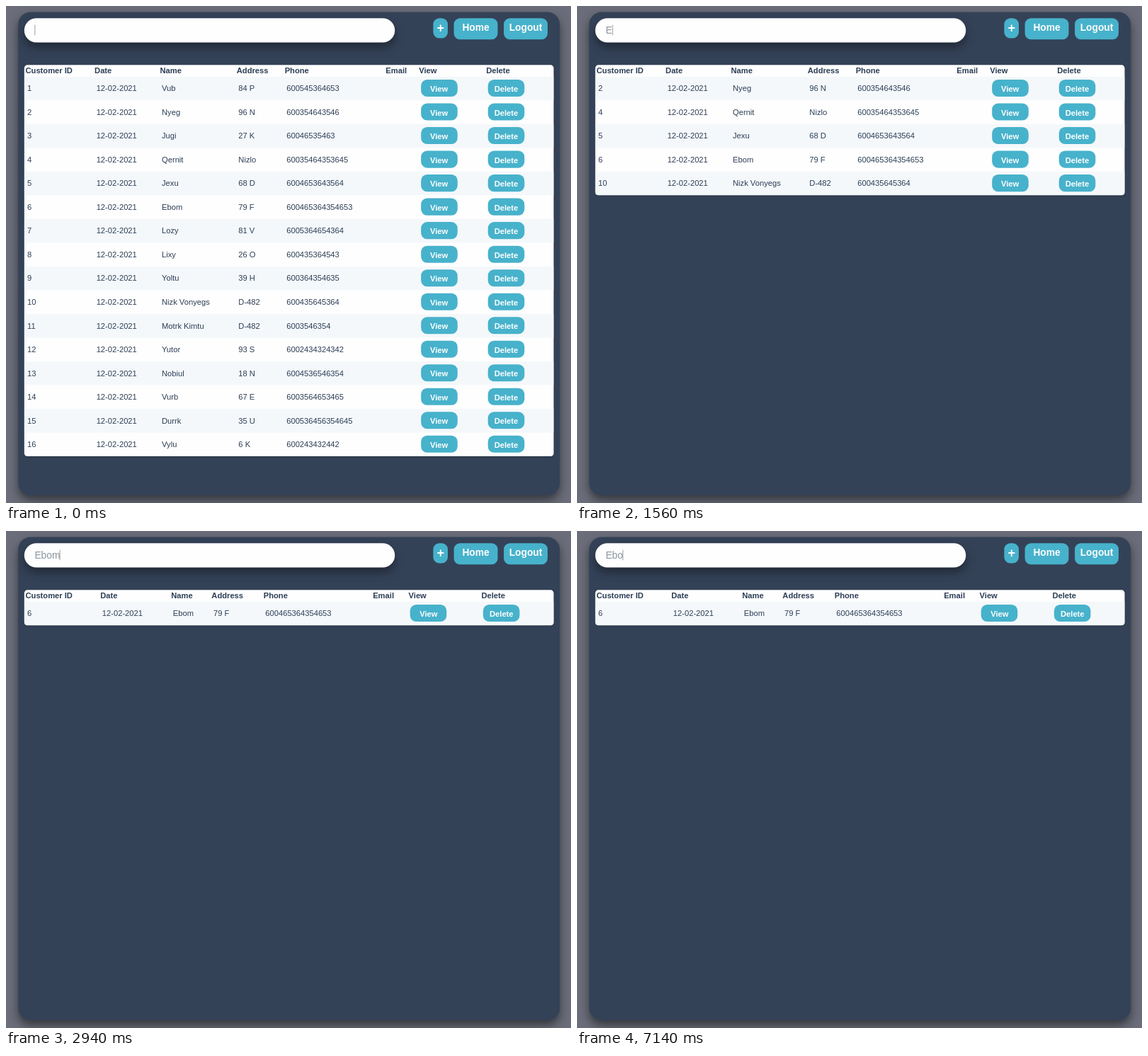
Recreate the animation shown at these times as an HTML page. Size 798 px wide and 702 px high, loop 8 s.

```html
<!DOCTYPE html>
<html lang="en">
<head>
<meta charset="utf-8">
<title>Customer search</title>
<style>
  * { box-sizing: border-box; }
  html, body { margin: 0; width: 798px; height: 702px; overflow: hidden; }
  body { background: #6b6e7a; }
  /* The page is laid out at full size and shown slightly reduced */
  .page {
    position: relative;
    width: 930px; height: 817px;
    transform: scale(.8595);
    transform-origin: 0 0;
    color: #2c3e55;
    font: 13px "Liberation Sans", Arial, sans-serif;
    white-space: nowrap;
  }
  .panel, .search, .view, .btn.top, .caret { position: absolute; }
  .panel {
    left: 20px; top: 10px; width: 890px; height: 794px;
    border-radius: 20px;
    background: #344258;
    box-shadow: 0 8px 16px rgba(0, 0, 0, .5);
  }
  .search {
    left: 30px; top: 20px; width: 609px; height: 40px;
    padding-left: 17px;
    border-radius: 20px;
    background: #fefefe;
    box-shadow: 0 8px 16px rgba(0, 0, 0, .4);
    color: #8b949d;
    font-size: 16px;
    line-height: 40px;
  }
  .btn {
    display: flex; align-items: center; justify-content: center;
    border-radius: 10px;
    background: #47b2cb;
    color: #fefefe;
    font-weight: bold;
  }
  .btn.top {
    top: 20px; width: 72px; height: 35px;
    padding-bottom: 4px;
    font-size: 16px;
  }
  .btn.add { width: 24px; height: 33px; padding-bottom: 1px; font-size: 21px; }

  .view {
    left: 30px; top: 97px; width: 870px;
    border-radius: 5px;
    overflow: hidden;
    background: #fefefe;
    box-shadow: 0 1px 3px rgba(0, 0, 0, .25);
    --cols: 113.5px 107.5px 126px 79px 166px 54.5px 110.5px 1fr;
  }
  .row {
    display: grid;
    grid-template-columns: var(--cols);
    align-items: center;
    height: 39px;
    padding-left: 5px;
  }
  .row:nth-child(even) { background: #f4f8fb; }
  .row.head { height: 19px; padding-left: 2px; font-weight: bold; }
  .row .btn {
    width: 60px; height: 28px;
    margin-bottom: 1px;
    padding-top: 3px;
  }
  #single { --cols: 123px 116.3px 66.5px 85.4px 179.7px 58.6px 119.7px 1fr; }

  /* One 8 s loop, hard changes only */
  .view, .caret, .search span { animation: 8s step-end infinite; }
  #all { animation-name: all; }
  #some { animation-name: some; }
  #single { animation-name: single; }
  @keyframes all { 0% { visibility: visible } 19.5%, 100% { visibility: hidden } }
  @keyframes some { 0%, 28.25%, 100% { visibility: hidden } 19.5% { visibility: visible } }
  @keyframes single { 0% { visibility: hidden } 28.25%, 100% { visibility: visible } }

  .search span:nth-child(1) { animation-name: key1; }
  .search span:nth-child(2) { animation-name: key2; }
  .search span:nth-child(3) { animation-name: key3; }
  .search span:nth-child(4) { animation-name: key4; }
  @keyframes key1 { 0% { visibility: hidden } 12.5%, 100% { visibility: visible } }
  @keyframes key2 { 0% { visibility: hidden } 22.5%, 100% { visibility: visible } }
  @keyframes key3 { 0% { visibility: hidden } 29.5%, 100% { visibility: visible } }
  @keyframes key4 { 0%, 89.25%, 100% { visibility: hidden } 36.75% { visibility: visible } }

  .caret {
    top: 31px; width: 1px; height: 17px;
    background: #8f8f8f;
    animation-name: caret;
  }
  @keyframes caret {
    0% { left: 47px; visibility: visible }
    6.75% { left: 47px; visibility: hidden }
    12.5% { left: 58px; visibility: visible }
    22.5% { left: 67px; visibility: visible }
    29.5% { left: 75px; visibility: visible }
    36.75% { left: 88px; visibility: visible }
    63% { left: 88px; visibility: hidden }
    84% { left: 88px; visibility: visible }
    89.25%, 100% { left: 75px; visibility: visible }
  }
</style>
</head>
<body>
<div class="page">
  <div class="panel"></div>
  <div class="search"><span>E</span><span>b</span><span>o</span><span>m</span></div>
  <div class="caret"></div>
  <div class="btn top add" style="left:702px">+</div>
  <div class="btn top" style="left:736px">Home</div>
  <div class="btn top" style="left:818px">Logout</div>
  <div class="view" id="all"></div>
  <div class="view" id="some"></div>
  <div class="view" id="single"></div>
</div>
<script>
  const heads = ['Customer ID', 'Date', 'Name', 'Address', 'Phone', 'Email', 'View', 'Delete'];
  const customers = [
    ['Vub', '84 P', '600545364653'],
    ['Nyeg', '96 N', '600354643546'],
    ['Jugi', '27 K', '60046535463'],
    ['Qernit', 'Nizlo', '60035464353645'],
    ['Jexu', '68 D', '6004653643564'],
    ['Ebom', '79 F', '600465364354653'],
    ['Lozy', '81 V', '6005364654364'],
    ['Lixy', '26 O', '600435364543'],
    ['Yoltu', '39 H', '600364354635'],
    ['Nizk Vonyegs', 'D-482', '600435645364'],
    ['Motrk Kimtu', 'D-482', '6003546354'],
    ['Yutor', '93 S', '6002434324342'],
    ['Nobiul', '18 N', '6004536546354'],
    ['Vurb', '67 E', '6003564653465'],
    ['Durrk', '35 U', '600536456354645'],
    ['Vylu', '6 K', '600243432442'],
  ].map(([name, address, phone], i) => ({ id: i + 1, name, address, phone }));

  const row = (cells, type = '') =>
    `<div class="row ${type}">${cells.map(c => `<div>${c}</div>`).join('')}</div>`;
  const button = label => `<div class="btn">${label}</div>`;

  function fill(id, query) {
    const found = customers.filter(c => c.name.toLowerCase().includes(query));
    const rows = found.map(c => row([
      c.id, '12-02-2021', c.name, c.address, c.phone, '', button('View'), button('Delete'),
    ]));
    document.getElementById(id).innerHTML = row(heads, 'head') + rows.join('');
  }

  fill('all', '');
  fill('some', 'e');
  fill('single', 'eb');
</script>
</body>
</html>
```
